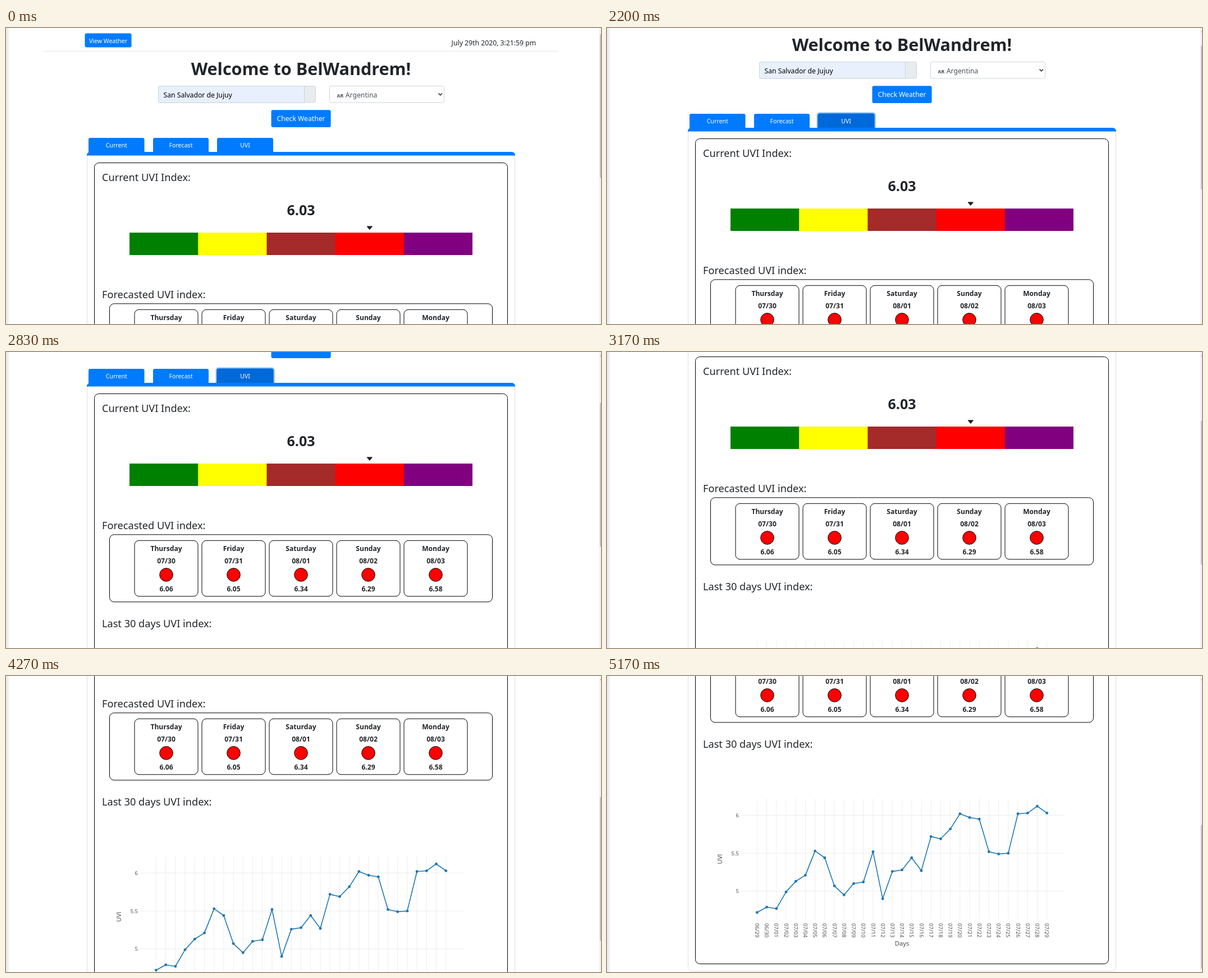
Recreate the animation shown at these times as an HTML page. Size 1060x528 px, loop 6710 ms.

```html
<!DOCTYPE html>
<html lang="en">
<head>
<meta charset="utf-8">
<title>Weather page</title>
<style>
  html, body { margin: 0; width: 100%; height: 100%; overflow: hidden; background: #fff; }
  svg { display: block; width: 1060px; height: 528px; font-family: "Noto Sans", "Open Sans", sans-serif; }
  .chart { font-family: "Open Sans", sans-serif; }
</style>
</head>
<body>
<svg id="stage" viewBox="0 0 1060 528" xmlns="http://www.w3.org/2000/svg">
  <defs>
    <linearGradient id="edge">
      <stop offset="0" stop-color="#e4e4e4"/>
      <stop offset="1" stop-color="#fff"/>
    </linearGradient>
  </defs>
  <g id="page"></g>
  <rect width="7" height="528" fill="url(#edge)"/>
  <rect x="1057" width="3" height="528" fill="#f1f1f1"/>
  <rect id="thumb" x="1058" width="2" height="256.5" fill="#c1c1c1"/>
  <path id="up" d="M1058.6 7.3L1060 5.6V7.3Z" fill="#505050"/>
</svg>
<script>
const LOOP = 6710, BLUE = '#007bff', INK = '#212529', MID = 525.5;
const $ = id => document.getElementById(id);

const text = (x, y, size, str, o = '') =>
  `<text x="${x}" y="${y}" font-size="${size}" fill="${INK}" ${o}>${str}</text>`;
const mid = (x, y, size, str, o = '') => text(x, y, size, str, 'text-anchor="middle" ' + o);
const rect = (x, y, x2, y2, fill, o = '') =>
  `<rect x="${x}" y="${y}" width="${x2 - x}" height="${y2 - y}" fill="${fill}" ${o}/>`;
const line = (x, y, x2, y2, color) =>
  `<path d="M${x} ${y}L${x2} ${y2}" stroke="${color}"/>`;
const box = (x, y, x2, y2) => rect(x, y, x2, y2, 'none', 'rx="8" stroke="#000"');
const button = (x, y, x2, y2, size, base, str, id = '') =>
  rect(x, y, x2, y2, BLUE, `rx="3" ${id && `id="${id}"`}`) +
  mid((x + x2) / 2, base, size, str, 'style="fill:#fff"');

function header() {
  return button(140.5, 9.6, 223.5, 34.6, 10.6, 26.6, 'View Weather') +
    text(944.2, 30.6, 12.22, '', 'id="clock" text-anchor="end"') +
    line(68, 41.5, 984, 41.5, '#e5e5e5') +
    mid(MID, 83.6, 30.55, 'Welcome to BelWandrem!', 'font-weight="700"') +
    rect(271.5, 103.5, 551.5, 133, '#e9ecef', 'rx="3" stroke="#ced4da"') +
    '<path d="M531.5 103.5H274.5a3 3 0 0 0-3 3V130a3 3 0 0 0 3 3H531.5Z" fill="#e8f0fe" stroke="#ced4da"/>' +
    text(280.5, 123.5, 12.2, 'San Salvador de Jujuy', 'style="fill:#000"') +
    rect(576.5, 103.5, 780.5, 133, '#fff', 'rx="3" stroke="#ced4da"') +
    text(589.5, 123.5, 8.8, 'AR', 'font-weight="600" style="fill:#495057"') +
    text(604.8, 123.5, 12.2, 'Argentina', 'style="fill:#495057"') +
    '<path d="M770.6 116.6L773.8 119.8L777 116.6" fill="none" stroke="#343a40" stroke-width="1.7"/>' +
    button(472.5, 146.2, 578.6, 177, 12.15, 166.3, 'Check Weather');
}

function panel() {
  return rect(373.6, 193.5, 478.6, 226, '#80bdff', 'rx="5" id="ring"') +
    button(147, 196, 246.5, 226, 10.6, 213, 'Current') +
    button(262, 196, 361, 226, 10.6, 213, 'Forecast') +
    button(376, 196, 476, 226, 10.6, 213, 'UVI', 'tab') +
    rect(144.5, 221.5, 906.5, 1055.5, '#fff', 'rx="6" stroke="#dfdfdf"') +
    `<path d="M144 228V227a6 6 0 0 1 6-6H901a6 6 0 0 1 6 6V228L905 227.4H146Z" fill="${BLUE}"/>` +
    box(157.5, 240.5, 893.5, 1042.5);
}

function current() {
  const colors = ['green', 'yellow', 'brown', 'red', 'purple'];
  return text(171, 273, 18.15, 'Current UVI Index:') +
    mid(MID, 334, 25, '6.03', 'font-weight="700"') +
    `<path d="M643.6 354H652L647.8 359Z" fill="${INK}" stroke="${INK}" stroke-width="1.4" stroke-linejoin="round"/>` +
    colors.map((c, i) => rect(220 + i * 122.2, 365, 831, 405, c)).join('');
}

function forecast() {
  const days = [
    ['Thursday', '07/30', '6.06'], ['Friday', '07/31', '6.05'], ['Saturday', '08/01', '6.34'],
    ['Sunday', '08/02', '6.29'], ['Monday', '08/03', '6.58']
  ];
  const card = ([name, date, uvi], i) => {
    const x = MID + (i - 2) * 120, bold = 'font-weight="700"';
    return box(x - 56.5, 502.3, x + 56.5, 601.8) +
      mid(x, 521, 12.1, name, bold) + mid(x, 543.4, 12.1, date, bold) +
      `<circle cx="${x}" cy="563.4" r="11.8" fill="red" stroke="#000"/>` +
      mid(x, 593.3, 12.1, uvi, bold);
  };
  return text(171, 482, 18.15, 'Forecasted UVI index:') +
    box(184.5, 491.8, 866.5, 611.8) + days.map(card).join('');
}

function chart() {
  const values = [
    4.72, 4.79, 4.77, 4.99, 5.13, 5.21, 5.53, 5.44, 5.07, 4.95, 5.10, 5.12, 5.52, 4.90, 5.26, 5.28,
    5.44, 5.27, 5.72, 5.69, 5.82, 6.02, 5.97, 5.95, 5.52, 5.49, 5.50, 6.02, 6.03, 6.12, 6.03
  ];
  const px = i => +(267.4 + i * 17.21).toFixed(2);
  const py = v => +(777.5 + (6 - v) * 135.3).toFixed(2);
  const gray = 'class="chart" style="fill:#444"';
  const day = i => i < 2 ? '06/' + (29 + i) : '07/' + String(i - 1).padStart(2, '0');
  let grid = '', labels = '', dots = '';
  values.forEach((v, i) => {
    const x = px(i);
    grid += line(x, 748, x, 963, '#eee');
    labels += text(0, 0, 9.64, day(i), `transform="translate(${x - 3.4} 970)rotate(90)" ${gray}`);
    dots += `<circle cx="${x}" cy="${py(v)}" r="2.45"/>`;
  });
  for (const v of [6, 5.5, 5]) {
    grid += line(238, py(v), 816, py(v), '#eee');
    labels += text(235, py(v) + 3.5, 9.64, v, 'text-anchor="end" ' + gray);
  }
  const path = values.map((v, i) => px(i) + ',' + py(v)).join(' ');
  return text(171, 657, 18.15, 'Last 30 days UVI index:') + grid +
    `<polyline points="${path}" fill="none" stroke="#1f77b4" stroke-width="1.6" stroke-linejoin="round"/>` +
    `<g fill="#1f77b4">${dots}</g>` + labels +
    mid(MID, 1009.6, 11.25, 'Days', gray) +
    mid(0, 0, 11.25, 'UVI', `transform="translate(205 855.5)rotate(-90)" ${gray}`);
}

$('page').innerHTML = header() + panel() + current() + forecast() + chart();

// Wheel notches [start, distance]; the view refreshes only at the given ticks.
const notches = [[2020, 85.2], [2519, 85.2], [2935, 85.2], [3430, 85.2], [3915, 85.2], [4375, 85.2], [4810, 17.8]];
const ticks = [
  0, 2100, 2200, 2270, 2370, 2600, 2700, 2830, 2930, 3070, 3170, 3300, 3500, 3600, 3730, 3830,
  4070, 4170, 4270, 4530, 4630, 4730, 5030, 5170
];
const ease = p => { p = Math.min(1, Math.max(0, p)); return p * p * (3 - 2 * p); };

function scrollAt(t) {
  const held = ticks.filter(k => k <= t).pop();
  return Math.round(notches.reduce((sum, [start, d]) => sum + d * ease((held - start) / 360), 0));
}

function draw(t) {
  const y = scrollAt(t), focused = t >= 1770;
  $('page').setAttribute('transform', `translate(0 ${-y})`);
  $('thumb').setAttribute('y', 11 + y * 0.481);
  $('up').setAttribute('visibility', y ? 'visible' : 'hidden');
  $('clock').textContent = 'July 29th 2020, 3:' + (t < 1230 ? '21:59' : '22:00') + ' pm';
  $('ring').setAttribute('visibility', focused ? 'visible' : 'hidden');
  $('tab').setAttribute('fill', focused ? '#0069d9' : BLUE);
  $('tab').setAttribute('stroke', focused ? '#0062cc' : 'none');
}

const start = performance.now();
function tick() {
  draw((performance.now() - start) % LOOP);
  requestAnimationFrame(tick);
}
tick();
</script>
</body>
</html>
```
